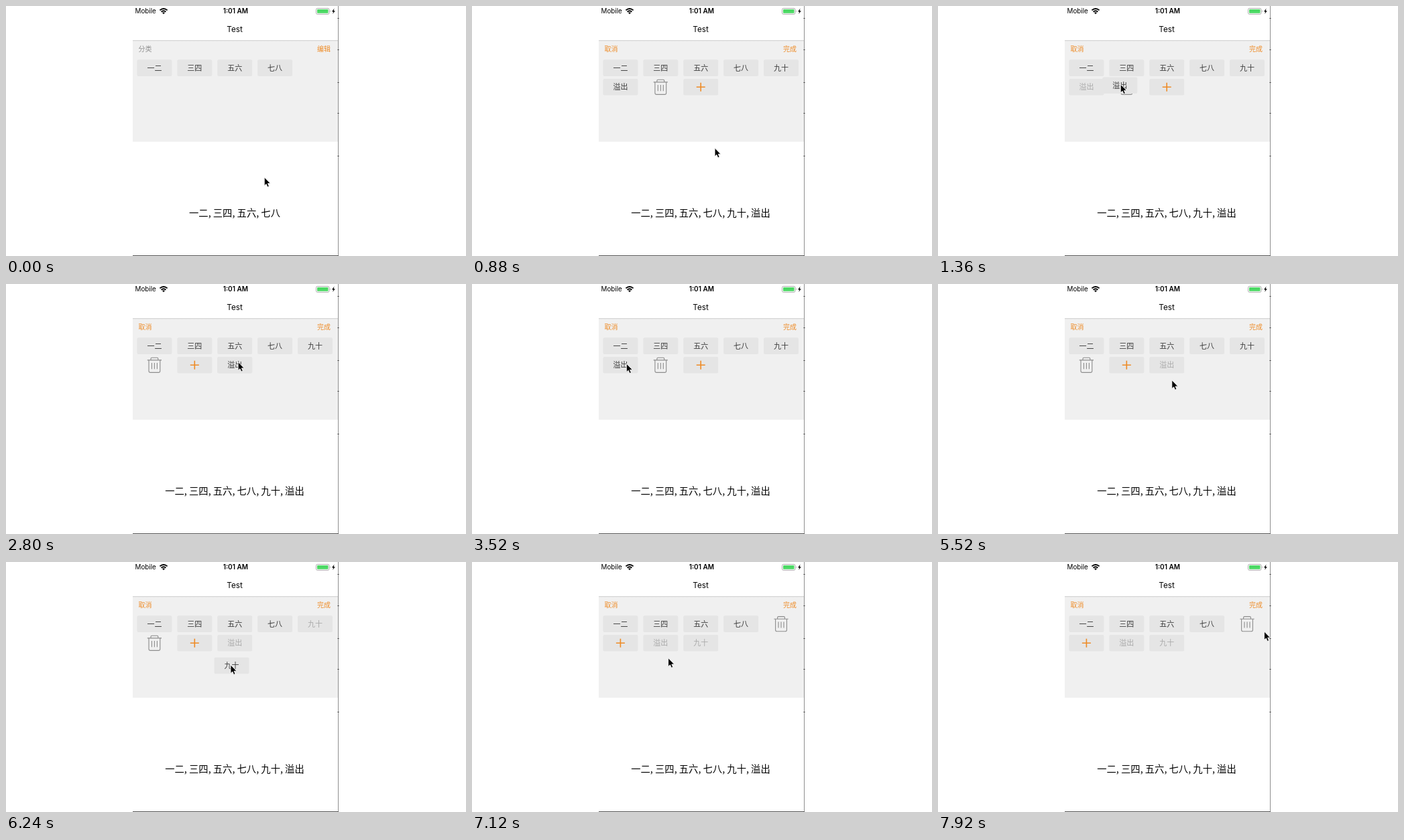
Animation, 686 px wide and 374 px high, one loop 8 s. Source, as an HTML page:

```html
<!DOCTYPE html>
<html lang="zh-CN">
<head>
<meta charset="utf-8">
<title>Test</title>
<style>
  html, body { margin: 0; width: 100%; height: 100%; overflow: hidden; background: #fff; }
  svg { display: block; width: 100vw; height: 100vh; }
  text { font-family: "Noto Sans CJK SC", "Noto Sans CJK JP", "Noto Sans CJK", sans-serif; }
  .ui { font-family: Inter, Roboto, sans-serif; }
  .mid { text-anchor: middle; }
  .orange { fill: #ee8b26; }
  .tag rect { fill: #e5e5e5; }
  .tag text { font-size: 11px; fill: #3a3a3a; }
  .tag.off text { fill: #aaa; }
</style>
</head>
<body>
<svg viewBox="0 0 686 374">
  <defs>
    <linearGradient id="edge" x2="0" y2="1">
      <stop stop-color="#cecece"/><stop offset="1" stop-color="#f0f0f0"/>
    </linearGradient>
  </defs>

  <!-- status bar -->
  <text class="ui" x="192.6" y="11.3" font-size="9.8">Mobile</text>
  <path d="M229.4 6.4Q235 1.6 240.6 6.4M231.6 8.7Q235 5.8 238.4 8.7" fill="none" stroke="#000" stroke-width="1.9"/>
  <path d="M233 10L235 12.2 237 10Q235 8.6 233 10Z"/>
  <text class="ui mid" x="342.3" y="11.3" font-size="10" font-weight="600">1:01 AM</text>
  <rect x="462.5" y="3.5" width="19.5" height="8.8" rx="2" fill="#fff" stroke="#999" stroke-width=".8"/>
  <rect x="464" y="5" width="16.5" height="5.8" rx=".8" fill="#4cd964"/>
  <path d="M483 6.3q1.6 1.6 0 3.2z" fill="#999"/>
  <path d="M489.6 3.6L486 8.4H488.2L487.2 12 490.8 7.2H488.6Z"/>
  <text class="ui mid" x="341" y="38.5" font-size="11.7">Test</text>

  <!-- panel -->
  <rect x="189" y="52" width="306" height="151" fill="#f0f0f0"/>
  <rect x="189" y="51" width="306" height="2" fill="url(#edge)"/>
  <g id="viewLabels" font-size="10">
    <text x="197.6" y="67.8" fill="#909090">分类</text>
    <text x="464" y="67.8" class="orange">编辑</text>
  </g>
  <g id="editLabels" font-size="10" class="orange">
    <text x="197.6" y="67.8">取消</text>
    <text x="464" y="67.8">完成</text>
  </g>

  <g id="plus" class="tag">
    <rect x="-26" y="-12.3" width="52" height="24.6" rx="2"/>
    <path d="M-6.5 0H6.5M0 -6.5V6.5" stroke="#ee8b26" stroke-width="1.6"/>
  </g>
  <g id="trash" fill="none" stroke="#8c8c8c" stroke-width="1.1">
    <path d="M-10.6 -7.3H10.6M-5.4 -7.3V-9.5Q-5.4 -11 -3.9 -11H3.9Q5.4 -11 5.4 -9.5V-7.3"/>
    <path d="M-8.4 -7.3V8.8Q-8.4 11.2 -6 11.2H6Q8.4 11.2 8.4 8.8V-7.3M-4 -3.2V6M0 -3.2V6M4 -3.2V6"/>
  </g>
  <g id="tags"></g>

  <text id="result" class="mid" x="341" y="314.5" font-size="14.3"></text>

  <!-- window edges -->
  <path d="M495.5 0V374" stroke="#8f8f8f"/>
  <path d="M189 373.5H496" stroke="#555"/>
  <path d="M494.5 18.5h2M494.5 65.5h2M494.5 114.5h2M494.5 160.5h2M494.5 224.5h2" stroke="#333"/>

  <path id="cursor" d="M0 0V12.6L2.8 10 4.7 14.4 7 13.4 5.1 9.2H9Z" stroke="#fff" stroke-width=".8"/>
</svg>
<script>
const LOOP = 8000, STEP = 80, GLIDE = 240, FADE = 160;
const EDIT = 480, RELOAD = 880;
const WORDS = ['一二', '三四', '五六', '七八', '九十', '溢出'];

const $ = id => document.getElementById(id);
const clamp = v => Math.max(0, Math.min(1, v));
const ease = v => (v = clamp(v), v * v * (3 - 2 * v));
const mix = (a, b, k) => a.map((v, i) => v + (b[i] - v) * k);
const place = (el, [x, y]) => el.setAttribute('transform', `translate(${x.toFixed(2)} ${y.toFixed(2)})`);
const slot = n => [221.4 + n % 5 * 59.9, n < 5 ? 92.6 : 121.2];
const near = (n, dx, dy) => [slot(n)[0] + dx, slot(n)[1] + dy];

// The script of the hand: plain moves, and drags that end with a drop.
const moves = [], drags = [];
const move = (start, to, time = 400) => moves.push({ start, to, time });
function drag(word, grab, drop, to, time) {
  drags.push({ word, grab, drop });
  move(grab, to, time);
}
const onTag = near(5, 1, -1.5), onTrash = near(6, -7, -6), rest = [336, 150];

move(0, [411, 245], 320);
move(800, onTag, 240);
drag('溢出', 1040, 1520, near(6, -9, -4), 320);
move(1520, rest);
move(2000, near(7, 5, -4.5), 480);
drag('溢出', 2800, 3200, near(5, 9, -2));
move(3600, near(5, 7, -6));
move(4320, onTag, 80);
drag('溢出', 4400, 4960, near(6, -5, -8.5));
move(4960, rest);
move(5440, near(4, -1.5, -1));
drag('九十', 5840, 6880, [335, 154]);
move(6320, onTag, 480);
move(6880, [401, 181], 560);
move(7520, [486.5, 104]);

const pointer = t => moves.filter(m => m.start < t)
  .reduce((at, m) => mix(at, m.to, ease((t - m.start) / m.time)), [385.3, 256.3]);

// Active tags come first, then the tools, then removed tags; each drop toggles its tag.
function layout(t) {
  const active = t < RELOAD ? WORDS.slice(0, 4) : [...WORDS];
  const removed = [];
  for (const { word, drop } of drags) {
    if (drop > t) break;
    const [from, to] = active.includes(word) ? [active, removed] : [removed, active];
    from.splice(from.indexOf(word), 1);
    to.push(word);
  }
  return { order: [...active, 'trash', 'plus', ...removed], removed };
}

const homeAt = (item, t) => slot(layout(t).order.indexOf(item));

function carried({ word, grab }, t) {
  const [from, to] = [pointer(grab), pointer(t)];
  return homeAt(word, grab).map((v, i) => v + to[i] - from[i]);
}

function position(item, t) {
  const last = drags.filter(d => d.drop <= t).pop();
  if (!last) return homeAt(item, t);
  const from = last.word === item ? carried(last, last.drop) : homeAt(item, last.drop - 1);
  return mix(from, homeAt(item, t), ease((t - last.drop) / GLIDE));
}

function makeTag(word) {
  const g = document.createElementNS('http://www.w3.org/2000/svg', 'g');
  g.setAttribute('class', 'tag');
  g.innerHTML = `<rect x="-26" y="-12.3" width="52" height="24.6" rx="2"/><text class="mid" y="4.2">${word}</text>`;
  $('tags').append(g);
  return g;
}
const tags = WORDS.map(word => ({ word, el: makeTag(word) }));
const floating = makeTag('');

function draw(t) {
  const { order, removed } = layout(t);
  const held = drags.find(d => d.grab <= t && t < d.drop);
  const editing = clamp((t - EDIT) / FADE);

  $('viewLabels').style.opacity = 1 - editing;
  $('editLabels').style.opacity = editing;
  for (const id of ['trash', 'plus']) {
    $(id).style.opacity = editing;
    place($(id), position(id, t));
  }

  for (const { word, el } of tags) {
    const shown = order.includes(word);
    el.style.opacity = shown ? 1 : 0;
    el.classList.toggle('off', removed.includes(word) || held?.word === word);
    if (shown) place(el, position(word, t));
  }
  floating.style.opacity = held ? 1 : 0;
  if (held) {
    floating.lastChild.textContent = held.word;
    place(floating, carried(held, t));
  }

  $('result').textContent = (t < RELOAD ? WORDS.slice(0, 4) : WORDS).join(', ');
  place($('cursor'), pointer(t));
}

const start = performance.now();
function tick() {
  const t = (performance.now() - start) % LOOP;
  draw(Math.floor(t / STEP) * STEP);
  requestAnimationFrame(tick);
}
tick();
</script>
</body>
</html>
```
